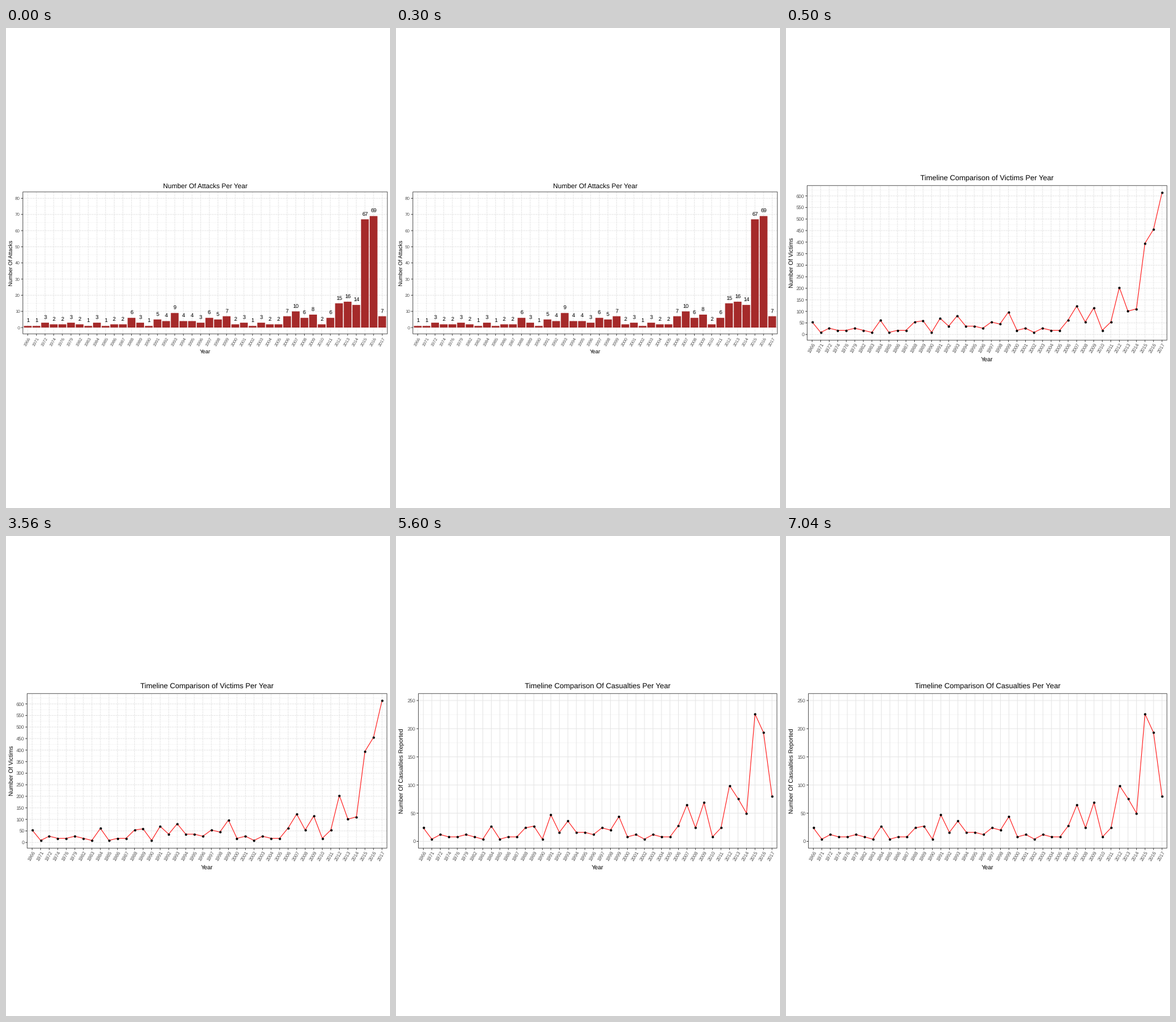
Animation, 626 px wide and 782 px high, one loop 8 s. Source, as a matplotlib script:

```python
import matplotlib.pyplot as plt
from matplotlib.animation import FuncAnimation
from matplotlib.collections import LineCollection
import numpy as np

W, H, DPI = 626, 782, 64
PT = 72 / DPI  # points per pixel
STEP = 100     # ms per animation step

plt.rcParams.update({"font.family": "Liberation Sans", "text.hinting": "none",
                     "toolbar": "None"})

YEARS = np.array([1966, 1971, 1972, 1974, 1976, 1979, *range(1982, 2018)])


def with_peaks(base, peaks):
    """Round a base series and set the years that stand out from it."""
    return np.array([peaks.get(int(year), int(round(v)))
                     for year, v in zip(YEARS, base)])


# A low ripple of attacks, about nine victims each, under half of them dead.
attacks = with_peaks(
    2 + 0.6 * np.cos(2 * np.pi * (YEARS - 1984) / 2.4),
    {1988: 6, 1991: 5, 1992: 4, 1993: 9, 1994: 4, 1995: 4, 1997: 6, 1998: 5,
     1999: 7, 2006: 7, 2007: 10, 2008: 6, 2009: 8, 2011: 6, 2012: 15,
     2013: 16, 2014: 14, 2015: 67, 2016: 69, 2017: 7})
victims = with_peaks(
    9 * attacks,
    {1966: 54, 1984: 61, 1989: 59, 1991: 70, 1999: 97, 2007: 123, 2009: 115,
     2012: 204, 2013: 101, 2014: 111, 2015: 395, 2016: 455, 2017: 615})
casualties = with_peaks(
    0.45 * victims,
    {1991: 47, 2007: 65, 2009: 69, 2012: 99, 2013: 76, 2015: 226, 2016: 193,
     2017: 80})

fig = plt.figure(figsize=(W / DPI, H / DPI), dpi=DPI, facecolor="white")
ax = fig.add_axes([0, 0, 1, 1])
ax.set(xlim=(0, W), ylim=(H, 0))
ax.axis("off")


class Chart:
    """A framed panel, placed in pixels, with its own value scale."""

    def __init__(self, box, x_ends, zero, unit, base):
        self.left, self.top, self.right, self.bottom = box
        self.x = np.linspace(*x_ends, len(YEARS))
        self.zero, self.unit, self.base = zero, unit, base
        self.parts = []

    def y(self, value):
        return self.zero - np.asarray(value) * self.unit

    def text(self, x, y, s, size, color="black", ha="center", va="baseline",
             angle=0, mode="default"):
        self.parts.append(ax.text(
            x, y, s, size=size * PT, color=color, ha=ha, va=va, rotation=angle,
            rotation_mode=mode, zorder=5))

    def lines(self, segments, color, width, z, style="solid"):
        self.parts.append(ax.add_collection(LineCollection(
            segments, colors=color, linewidths=width * PT, linestyles=style,
            zorder=z, snap=False)))

    def rows(self, values, x0, x1):
        return [[(x0, self.y(v)), (x1, self.y(v))] for v in values]

    def columns(self, y0, y1):
        return [[(x, y0), (x, y1)] for x in self.x]

    def grid(self, major, minor, style):
        self.lines(self.rows(minor, self.left, self.right), "#f2f2f2", 0.7, 1,
                   style)
        self.lines(self.rows(major, self.left, self.right)
                   + self.columns(self.bottom, self.top), "#e6e6e6", 1, 1,
                   style)

    def frame(self, major, tick=3):
        self.parts.append(ax.add_patch(plt.Rectangle(
            (self.left, self.top), self.right - self.left,
            self.bottom - self.top, fill=False, ec="#5c5c5c",
            lw=1 * PT, zorder=4, snap=False)))
        self.lines(self.rows(major, self.left - tick, self.left)
                   + self.columns(self.bottom, self.bottom + tick),
                   "#444444", 1, 4)

    def labels(self, major, title, title_y, y_name, year_y, name_y, shift):
        small, mid = 0.79 * self.base, 0.97 * self.base
        for v in major:
            self.text(self.left - 4.5, self.y(v) + 0.36 * small, str(v), small,
                      "#4d4d4d", "right")
        for x, year in zip(self.x, YEARS):
            self.text(x + shift, year_y, str(year), small, "#4d4d4d",
                      va="center", angle=60)
        center = (self.left + self.right) / 2
        self.text(center, title_y, title, 1.205 * self.base)
        self.text(center, name_y, "Year", mid)
        self.text(5 + 0.72 * mid, (self.top + self.bottom) / 2, y_name, mid,
                  angle=90, mode="anchor")

    def bars(self, values):
        width = 0.9 * (self.x[1] - self.x[0])
        self.parts += ax.bar(self.x, -values * self.unit, width,
                             bottom=self.zero, color="#a52a2a", zorder=3,
                             snap=False)
        for x, v in zip(self.x, values):
            self.text(x, self.y(v) - 6, str(v), 9)

    def trend(self, values):
        self.parts += ax.plot(self.x, self.y(values), color="#ff1a1a",
                              lw=1.1 * PT, zorder=2)
        self.parts += ax.plot(self.x, self.y(values), "o", color="black",
                              ms=3.9 * PT, mew=0, zorder=3)

    def show(self, on):
        for part in self.parts:
            part.set_visible(on)


def attack_chart():
    c = Chart((27.5, 267, 621.7, 498.3), (35.5, 613.3), 488, 2.632, 9.1)
    major = range(0, 81, 10)
    c.grid(major, range(5, 80, 10), (0, (3, 1)))
    c.bars(attacks)
    c.frame(major)
    c.labels(major, "Number Of Attacks Per Year", 261.5, "Number Of Attacks",
             511, 530, -0.7)
    return c


def trend_chart(values, left, first_x, zero, unit, major, minor, style, title,
                y_name):
    c = Chart((left, 256.7, 621, 508.6), (first_x, 613), zero, unit, 10)
    c.grid(major, minor, style)
    c.trend(values)
    c.frame(major)
    c.labels(major, title, 248.7, y_name, 521.8, 543.3, -1)
    return c


charts = [
    attack_chart(),
    trend_chart(victims, 34.5, 42.6, 499.3, 0.3762, range(0, 601, 50),
                range(25, 626, 50), (0, (3, 1)),
                "Timeline Comparison of Victims Per Year",
                "Number Of Victims"),
    trend_chart(casualties, 36.5, 44.5, 497.5, 0.918, range(0, 251, 50),
                range(25, 251, 50), "solid",
                "Timeline Comparison Of Casualties Per Year",
                "Number Of Casualties Reported"),
]
STARTS = [0, 500, 5600]


def draw(i):
    current = sum(i * STEP >= s for s in STARTS) - 1
    for k, chart in enumerate(charts):
        chart.show(k == current)
    return []


anim = FuncAnimation(fig, draw, frames=80, interval=STEP, repeat=True,
                     repeat_delay=0, blit=False, init_func=lambda: draw(0))
plt.show()
```
